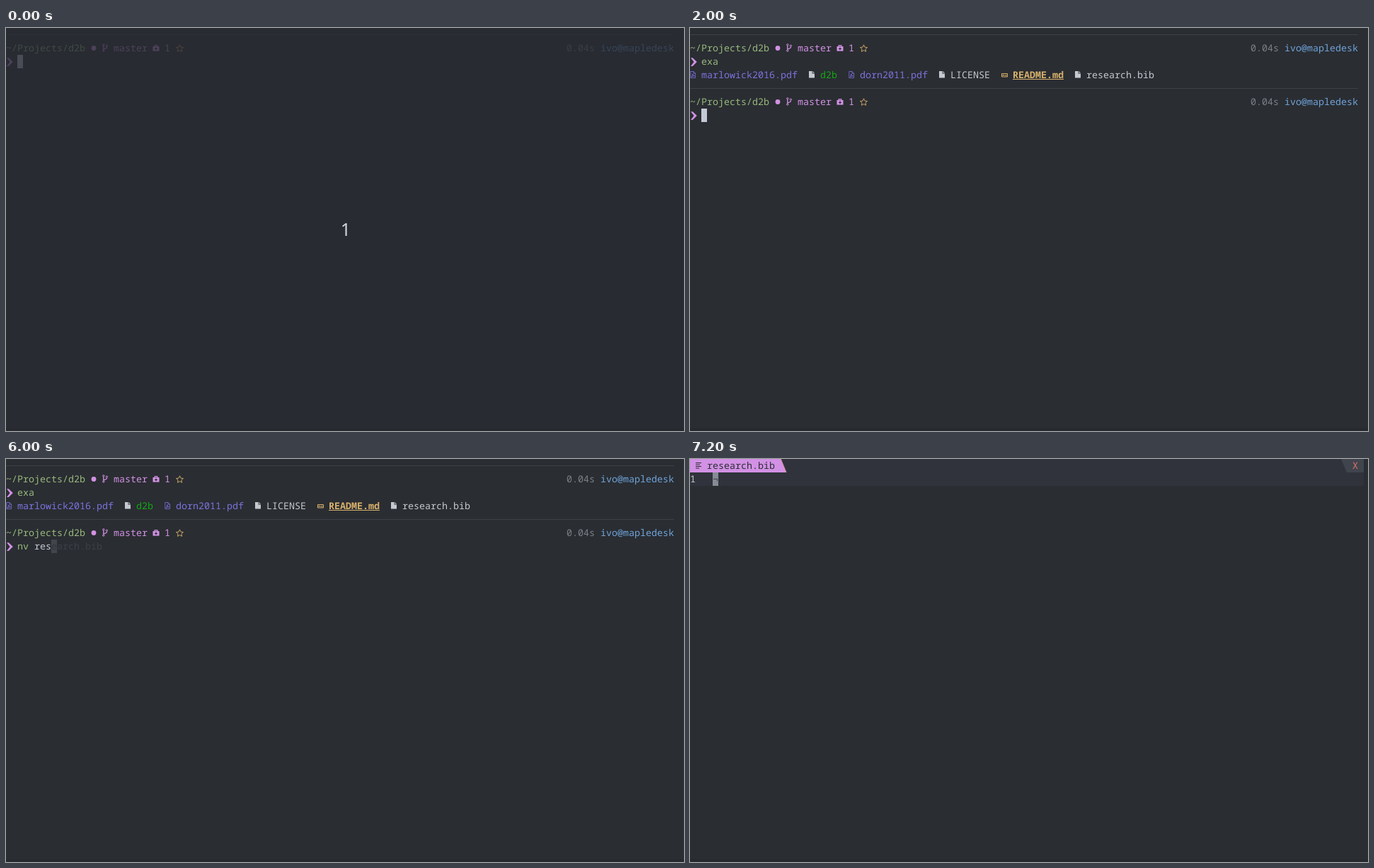
An HTML page for the animation above (8 s loop, 958 by 570 pixels).

```html
<!DOCTYPE html>
<html lang="en">
<head>
<meta charset="utf-8">
<title>Terminal session</title>
<style>
  html, body { margin: 0; width: 100%; height: 100%; overflow: hidden; background: #2a2d32; }
  svg { display: block; width: 958px; height: 570px; }
  text {
    font: 13.3333px "Noto Sans Mono", "Liberation Mono", monospace;
    font-variant-ligatures: none;
    text-rendering: geometricPrecision;
    white-space: pre;
  }
  .bold { font-weight: 700; }
  .count { font: 25px "Noto Sans", "Open Sans", sans-serif; }
</style>
</head>
<body>
<svg id="stage" viewBox="0 0 958 570"></svg>
<script>
const LOOP = 8000, CELL = 8, ROW = 19;
const C = {
  bg: '#2a2d32', dimBg: '#282b32', edge: '#26292e', rule: '#3e4147',
  fg: '#c5c9cf', cursor: '#c3cad6', green: '#98b87c', pink: '#d291e4',
  yellow: '#d8b26c', blue: '#6fa3d8', grey: '#7d8087', red: '#e0736c',
  ghost: '#3d4147', ghostCursor: '#42464c', pdf: '#7b73de', exec: '#13a813'
};

const rect = (x, y, w, h, fill) =>
  `<rect x="${x}" y="${y}" width="${w}" height="${h}" fill="${fill}"/>`;
const shape = (d, fill, extra = '') => `<path d="${d}" fill="${fill}" ${extra}/>`;
const stroke = (d, color, width = 1) =>
  shape(d, 'none', `stroke="${color}" stroke-width="${width}"`);
const at = (x, y, body) => `<g transform="translate(${x} ${y})">${body}</g>`;
const text = (col, row, str, fill, cls = '') =>
  `<text x="${col * CELL}" y="${row * ROW + 14}" fill="${fill}" class="${cls}">${str}</text>`;
const block = (col, row, fill) => rect(col * CELL, row * ROW, CELL, ROW, fill);

const icons = {
  branch: stroke('M1.8 3V9M6.4 4.5V5Q6.4 7 2 7.6', C.pink, 1.3) +
    [[1.8, 1.8], [6.4, 3.2], [1.8, 10]].map(([x, y]) =>
      `<circle cx="${x}" cy="${y}" r="1.2" fill="${C.bg}" stroke="${C.pink}"/>`).join(''),
  kit: stroke('M2.7 2.5V.6H6.3V2.5', C.pink, 1.2) + rect(0, 2, 9, 6.6, C.pink) +
    stroke('M4.5 3.4V7.2M2.6 5.3H6.4', C.bg, 1.2),
  star: stroke('M5.5 .8L7 4.1L10.5 4.5L7.9 6.9L8.6 10.3L5.5 8.6L2.4 10.3L3.1 6.9L.5 4.5L4 4.1Z', C.yellow, .9),
  pdf: stroke('M.8 .5H5.2L7.6 3V9.6H.8ZM5 .6V3.2H7.5M2 8.2Q4 6 3.8 3.8Q4.3 6.6 6.5 7Q4 6.6 2 8.2', C.pdf, .8),
  file: shape('M0 0H4.6V3.4H8V9.5H0Z', C.fg) + shape('M5.4 0L8 2.6H5.4Z', C.fg),
  mark: stroke('M.5 .5H8.5V5H.5Z', C.yellow, 1) +
    stroke('M2 4V2L3 3L4 2V4M6.4 1.6V3.8M5.5 3L6.4 4L7.3 3', C.yellow, .8)
};

function chevron(row, back) {
  const d = back ? 'M9.8 4.2H7L1 10L7 16H9.8L5.2 10Z' : 'M1 4.2H3.8L9.8 10L3.8 16H1L5.6 10Z';
  return at(0, row * ROW, shape(d, C.pink));
}

// Rule, status line and prompt sign, starting at the given row.
function prompt(row, back = false) {
  const y = (row + 1) * ROW, r = row + 1;
  return rect(0, row * ROW + 9, 944, 1, C.rule) +
    text(0, r, '~/Projects/d2b', C.green) +
    `<circle cx="124" cy="${y + 9.5}" r="3.4" fill="${C.pink}"/>` +
    at(136, y + 3, icons.branch) + text(19, r, 'master', C.pink) +
    at(207.5, y + 5, icons.kit) + text(28, r, '1', C.pink) +
    at(240, y + 4, icons.star) +
    text(99, r, '0.04s', C.grey) + text(105, r, 'ivo@mapledesk', C.blue) +
    chevron(row + 2, back);
}

// Typed command, block cursor and the faint suggestion after it.
function input(row, full, n, color) {
  const typed = full.slice(0, n), rest = full.slice(n);
  const word = typed.split(' ')[0], args = typed.slice(word.length);
  const col = 2 + n, hint = n > 0 && rest;
  let out = text(2, row, word, color, color === C.red ? 'bold' : '');
  if (args) out += text(2 + word.length, row, args, C.fg);
  out += block(col, row, hint ? C.ghostCursor : C.cursor);
  if (hint) {
    out += text(col, row, rest[0], '#30343a') + text(col + 1, row, rest.slice(1), C.ghost);
  }
  return out;
}

function listing() {
  const files = [
    [0, 'pdf', 'marlowick2016.pdf', C.pdf], [21, 'file', 'd2b', C.exec],
    [28, 'pdf', 'dorn2011.pdf', C.pdf], [44, 'file', 'LICENSE', C.fg],
    [55, 'mark', 'README.md', C.yellow], [68, 'file', 'research.bib', C.fg]
  ];
  return files.map(([col, icon, name, color]) => {
    const mark = icon === 'mark';
    return at(col * CELL, 57 + (mark ? 7 : 4), icons[icon]) +
      text(col + 2, 3, name, color, mark ? 'bold' : '') +
      (mark ? rect((col + 2) * CELL, 72, name.length * CELL, 1, color) : '');
  }).join('');
}

const firstCommand = (n, color) => prompt(0) + input(2, 'exa', n, color);

const history = () => prompt(0) + text(2, 2, 'exa', C.green) + listing();

const secondCommand = (n, color = C.green) =>
  history() + prompt(4) + input(6, 'nv research.bib', n, color);

const completed = () => history() + prompt(4, true) +
  text(2, 6, 'nv', C.green) + text(5, 6, 'research.bi', C.pink) +
  block(16, 6, C.pink) + text(16, 6, 'b', C.bg);

const countdown = () => rect(0, 0, 958, 566, C.dimBg) +
  `<g opacity=".22">${firstCommand(0, C.green)}</g>` +
  `<text class="count" x="480" y="294" text-anchor="middle" fill="#d3d6da">1</text>`;

const editor = () => rect(0, 0, 952, 38, '#30333b') +
  rect(0, 0, 128, ROW, C.pink) +
  shape('M128 0L136 19H128Z', C.pink) +
  stroke('M128.3 0L136 19', '#d79aa0', 1) +
  stroke('M8 5.5H16M8 8H14M8 10.5H16M8 13H13', C.bg, 1.1) +
  text(3, 0, 'research.bib', '#2b2e36') +
  shape('M920 0H952V19H928Z', '#40444c') + text(117, 0, 'X', C.red) +
  text(0, 1, '1', C.fg) + block(4, 1, '#858c96') + text(4, 1, '¬', '#3a3e46');

const scenes = [
  [0, countdown],
  [500, () => firstCommand(0, C.green)],
  [800, () => firstCommand(1, C.red)],
  [1000, () => firstCommand(2, C.green)],
  [1400, () => firstCommand(3, C.green)],
  [2000, () => secondCommand(0)],
  [4600, () => secondCommand(1, C.red)],
  [4800, () => secondCommand(2)],
  [5000, () => secondCommand(3)],
  [5400, () => secondCommand(4)],
  [5500, () => secondCommand(5)],
  [6000, () => secondCommand(6)],
  [7000, completed],
  [7100, () => ''],
  [7200, editor]
];

const stage = document.getElementById('stage');
let shown;

function render(t) {
  const scene = scenes.findLast(([start]) => start <= t);
  if (scene === shown) return;
  shown = scene;
  stage.innerHTML = rect(0, 0, 958, 570, C.bg) + rect(0, 566, 958, 4, C.edge) + scene[1]();
}

function tick() {
  render(performance.now() % LOOP);
  requestAnimationFrame(tick);
}
tick();
</script>
</body>
</html>
```
